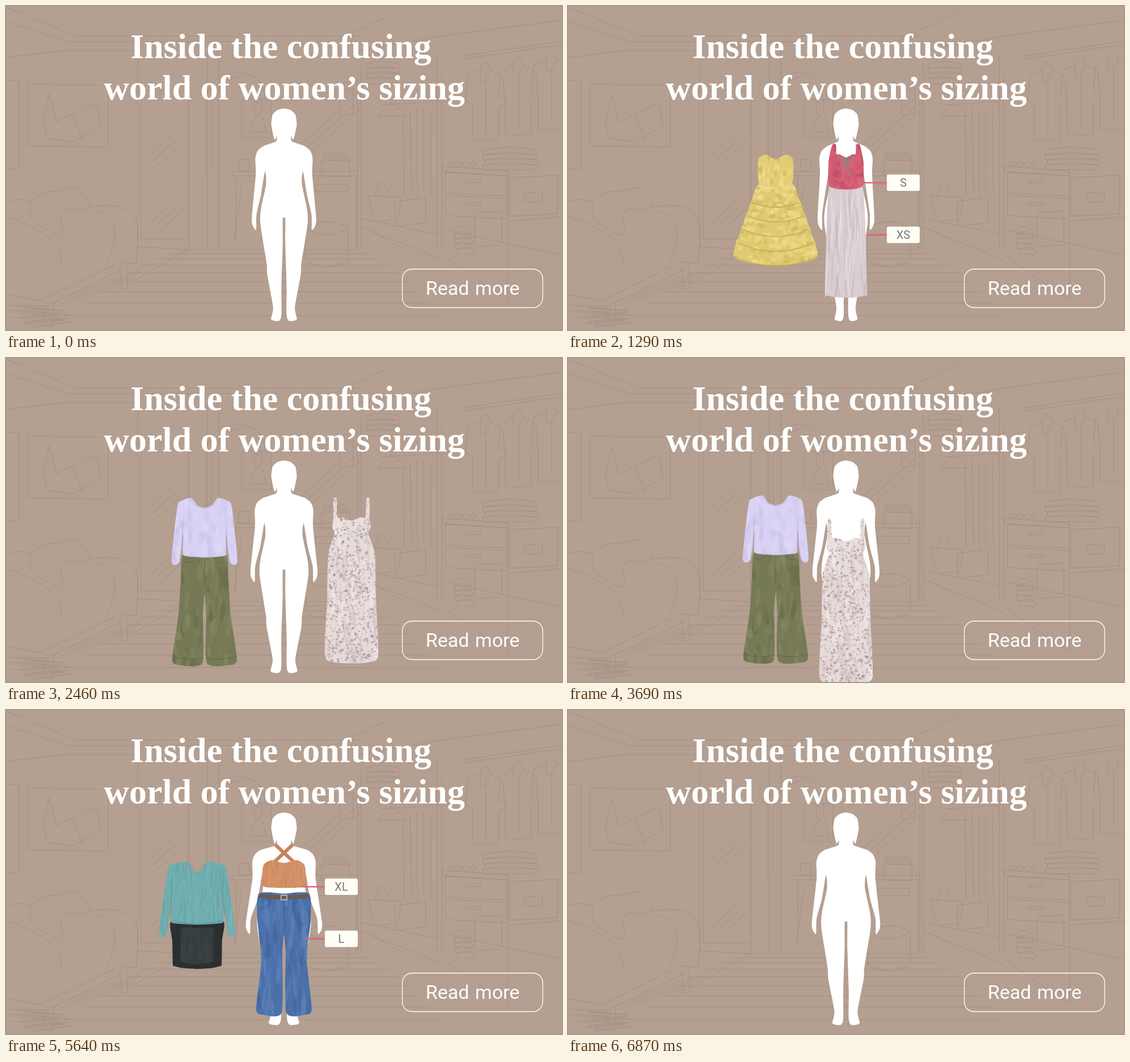
Recreate the animation shown at these times as an HTML page with a canvas. Size 980 by 572 pixels, loop 6.9 s.

```html
<!DOCTYPE html>
<html lang="en">
<head>
<meta charset="utf-8">
<title>Inside the confusing world of women’s sizing</title>
<style>
  html, body { margin: 0; width: 980px; height: 572px; overflow: hidden; background: #b49f91; }
  canvas, svg { position: absolute; left: 0; top: 0; }
  .title { font: bold 62px "Liberation Serif", serif; fill: #fff; text-anchor: middle; }
  .button { font: 34px Roboto, sans-serif; fill: #fff; text-anchor: middle; word-spacing: 2px; }
</style>
</head>
<body>
<canvas id="stage" width="980" height="572"></canvas>
<svg width="980" height="572">
  <text class="title" x="484.5" y="92">Inside the confusing</text>
  <text class="title" x="490.5" y="165">world of women’s sizing</text>
  <rect x="698.5" y="464.5" width="247.5" height="68" rx="17" fill="none" stroke="#fff" stroke-width="1.3"/>
  <text class="button" x="822.5" y="510">Read more</text>
</svg>
<script>
const LOOP = 6900, W = 980, H = 572, CENTER = 490;
const stage = document.getElementById('stage').getContext('2d');

let seed = 7;
const random = () => (seed = seed * 16807 % 2147483647) / 2147483647;
const between = (a, b) => a + (b - a) * random();
const clamp = p => Math.min(1, Math.max(0, p));
const progress = (t, a, b) => clamp((t - a) / (b - a));
const inOut = p => p < .5 ? 4 * p ** 3 : 1 - 4 * (1 - p) ** 3;
const settle = p => 1 - 1.48 * (1 - p) ** 3 + .48 * (1 - p) ** 2;
const repeat = (n, draw) => { for (let i = 0; i < n; i++) draw(i); };

function layer(paint) {
  const canvas = document.createElement('canvas');
  canvas.width = W;
  canvas.height = H;
  paint(canvas.getContext('2d'));
  return canvas;
}

function line(c, d, color, width = 1) {
  c.strokeStyle = color;
  c.lineWidth = width;
  c.stroke(new Path2D(d));
}

// Smooth closed outline mirrored about x = 0; half runs from top centre to bottom centre.
function mirrored(half) {
  const left = half.slice(1, -1).reverse().map(([x, y]) => [-x, y]);
  const pts = [...half, ...left], n = pts.length, path = new Path2D();
  path.moveTo(...pts[0]);
  pts.forEach((p, i) => {
    const before = pts[(i + n - 1) % n], q = pts[(i + 1) % n], after = pts[(i + 2) % n];
    path.bezierCurveTo(
      p[0] + (q[0] - before[0]) / 9, p[1] + (q[1] - before[1]) / 9,
      q[0] - (after[0] - p[0]) / 9, q[1] - (after[1] - p[1]) / 9, ...q);
  });
  path.closePath();
  return path;
}

// The room, as a loose line drawing

const room = layer(c => {
  c.fillStyle = '#b49f91';
  c.fillRect(0, 0, W, H);
  const ink = d => line(c, d, '#a38e81', .9);
  const box = (x, y, w, h, slant = 0) => ink(`M${x} ${y}l${w} ${slant}v${h}l${-w} ${-slant}z`);
  const glare = (x, y, size) => repeat(3, i => ink(`M${x + i * 9} ${y + i * 7}l${size} ${-size * .9}`));
  const pile = (x, y, w, n) => repeat(n, i =>
    ink(`M${x + between(-4, 4)} ${y + i * 9}q${w / 2} -9 ${w} 0q6 4 0 8h${-w}z`));
  const drawer = (x, y, w) => {
    box(x, y, w, 36, 6);
    box(x + w * .33, y + 14, w * .25, 5, -2);
  };

  ink('M0 2L124 53H620M0 28L110 63H470M0 91L100 79H228M580 62L690 10M625 78L768 53L980 25');
  for (const x of [232, 322, 355, 375, 620, 626, 760, 768]) ink(`M${x} ${between(60, 140)}V428`);
  box(-5, 131, 28, 157);
  box(38, 138, 142, 109, 2);
  ink('M72 234L66 205L76 155L90 205L118 190L160 172L168 212L116 240zM118 190L135 238');
  box(238, 150, 84, 261);
  glare(246, 270, 50);
  glare(252, 384, 44);
  glare(520, 245, 90);
  ink('M352 300V165Q362 118 408 118Q452 118 456 160M362 290V170Q376 128 412 125');
  box(415, 165, 52, 67);
  ink('M437 182v-16l7 8l7 -8v16q-7 24 -14 0M440 195l-10 27h30l-8 -27');
  box(588, 150, 24, 44, -4);

  // Dressing table and stool
  box(398, 292, 222, 8);
  box(545, 315, 57, 13);
  box(410, 271, 19, 20);
  box(556, 272, 50, 28, 1);
  repeat(6, i => ink(`M${560 + i * 8} 273v${between(-8, -16)}h4v12`));
  ink('M405 300V415M415 318L402 415M617 300V428M528 392Q565 370 603 392Q565 416 528 392V450Q565 472 603 450V392');

  repeat(9, i => ink(`M${310 - i * 24} ${430 + i * 6 + i * i * 1.07}H${620 + i * 18}`));

  // Bed with sleeping dog, and rug
  ink('M44 346Q60 325 100 326Q130 312 134 332Q150 342 150 355L128 361Q96 350 96 380Q104 398 96 406Q30 382 44 346');
  ink('M0 345Q20 338 44 346M150 355Q232 340 233 400L230 455L200 452L60 520L0 510M0 372Q100 400 98 460M160 362Q212 372 180 450');
  ink('M0 528L70 530L205 465M66 530l2 36h14l2 -42M200 460l4 40h10v-42M232 425L320 430L214 492');
  repeat(16, i => ink(`M${between(0, 50)} ${530 + i * 2.5}l70 ${6 - i}`));
  repeat(14, i => ink(`M${95 + i * 9} ${530 - i * 3}l30 -28`));

  // Wardrobe
  repeat(2, i => drawer(774, 294 + i * 40, 110));
  box(770, 283, 114, 9, 8);
  box(826, 365, 48, 60, -3);
  box(888, 303, 84, 68, -4);
  box(914, 330, 31, 17, -2);
  box(686, 345, 54, 44, -6);
  ink('M625 375L770 405M625 390L768 448M640 395L706 432M884 292V520L770 440M884 380L980 372M770 395L980 440');
  ink('M640 335q5 45 20 45l30 -4l7 -38zM650 337q10 -50 28 0');
  pile(842, 254, 92, 4);
  pile(792, 394, 28, 5);
  pile(634, 102, 56, 4);
  repeat(4, i => ink(`M${778 + i * 13} 280q6 -10 12 -1q-6 11 -12 1`));
  ink('M805 88L980 62M805 94L980 68M660 175L765 168M656 194l24 -24l26 24z');
  repeat(5, i => ink(`M${700 + i * 12} 180l${between(0, 6)} ${between(145, 160)}`));
  repeat(3, i => {
    const x = 836 + i * 58, y = 112 - i * 9;
    ink(`M${x} ${y}q8 -27 18 0l22 14l4 48l-12 4v58h-46v-62l-12 -6l4 -44zv20q8 6 18 -20M${x + 10} ${y + 16}v100`);
  });
});

// Clothes, painted where they are worn with x = 0 in the middle of the figure

const garment = paint => layer(c => {
  c.translate(CENTER, 0);
  paint(c);
});

// Fills a mirrored piece of cloth and mottles it with small ellipses.
function cloth(c, half, base, tones, count, rx, ry) {
  const path = mirrored(half);
  const reach = Math.max(...half.map(p => p[0]));
  const ys = half.map(p => p[1]), top = Math.min(...ys), bottom = Math.max(...ys);
  c.save();
  c.fillStyle = base;
  c.fill(path);
  c.clip(path);
  repeat(count, i => {
    c.fillStyle = tones[i % tones.length];
    c.globalAlpha = between(.35, .8);
    c.beginPath();
    c.ellipse(between(-reach, reach), between(top, bottom),
      rx * between(.5, 1.2), ry * between(.5, 1.2), between(-.15, .15), 0, 7);
    c.fill();
  });
  c.restore();
}

const skirt = (top, waist, bottom, hem, sag) => [
  [0, top], [waist, top], [waist + (hem - waist) * .7, top + (bottom - top) * .45], [hem, bottom],
  [hem * .94, bottom + sag * .4], [hem * .55, bottom + sag * .85], [0, bottom + sag]];

const trousers = (top, waist, hip, knee, hem, bottom) => [
  [0, top], [waist, top], [hip, top + 45], [knee, top + (bottom - top) * .55], [hem, bottom - 10],
  [hem * .75, bottom], [4, bottom - 4], [3, top + 105], [0, top + 70]];

const sleeved = (top, neck, depth, shoulder, cuff, cuffY, waist, hemY) => [
  [0, top + depth], [neck * .65, top + depth * .75], [neck + 4, top], [shoulder - 7, top + 5], [shoulder, top + 16],
  [cuff, cuffY], [cuff - 13, cuffY + 2], [waist, top + 62], [waist, hemY - 8], [waist - 3, hemY], [0, hemY + 3]];

const strapped = (top, strap, neckY, bust, ...tail) => [
  [0, neckY], [strap * .6, neckY - 6], [strap - 1, neckY - 7], [strap, top], [strap + 6, top], [bust - 2, neckY - 4],
  [bust, neckY + 12], ...tail];

const yellow = garment(c => {
  const tones = ['#ecd983', '#d2bb63', '#f0df92'];
  const hem = i => [33 + i * 8.3, 326 + i * 23.5];
  for (let i = 5; i > 0; i--) {
    const [waist, top] = hem(i - 1), [reach, bottom] = hem(i), sag = 7 + i * 2.4;
    cloth(c, skirt(top - 8, waist - 5, bottom, reach, sag), '#e0ca70', tones, 75, 6, 5);
    line(c, `M${-reach} ${bottom + 3}Q0 ${bottom + sag * 2} ${reach} ${bottom + 3}`, '#c4ac56', 1.6);
  }
  cloth(c, [[0, 276], [15, 268], [24, 269], [31, 278], [29, 318], [0, 325]], '#e3cd74', tones, 45, 3, 8);
});

const redAndSkirt = garment(c => {
  cloth(c, skirt(321, 29, 508, 37, 7), '#d8cdd0', ['#e7dfe1', '#c8b9bd', '#ddd0d5'], 85, 1.6, 48);
  cloth(c, strapped(245, 18, 268, 31, [29, 318], [0, 324]), '#cf5a70', ['#de657c', '#bf4d65', '#d6627a'], 55, 6, 9);
  line(c, 'M0 269q-14 -9 -10 3q6 4 10 -3q14 -9 11 3q-6 4 -11 -3l-6 25m6 -25l6 30', '#7c8b82', 2);
});

const lavenderAndTrousers = garment(c => {
  cloth(c, trousers(341, 38, 42, 46, 57, 536), '#767955', ['#858962', '#6a6d4a', '#7c7f59'], 90, 5, 17);
  line(c, 'M-56 521q27 8 53 2M56 521q-27 8 -53 2M-36 352q11 8 18 -6M36 352q-11 8 -18 -6M0 346v50', '#616541');
  cloth(c, sleeved(241, 20, 17, 48, 58, 352, 38, 343), '#d9d2f4', ['#dfdaf7', '#cbc3ec', '#d3cbf1'], 60, 5, 12);
  line(c, 'M-38 284L-41 338M38 284L41 338M-22 248q22 22 44 0', '#bbb1df');
});

const floral = garment(c => {
  const cut = strapped(243, 26, 281, 34, [30, 304], [41, 340], [43, 420], [47, 519], [30, 531], [0, 533]);
  cloth(c, cut, '#e5dbd9', ['#eee7e5', '#d5c7c5'], 100, 3, 22);
  cloth(c, cut, 'transparent', ['#c98791', '#f4efed', '#8d83a3', '#d9a9ad', '#989c91', '#c3a6aa'], 1000, 2.1, 1.9);
});

const tealAndSkirt = garment(c => {
  cloth(c, skirt(340, 46, 416, 43, 8), '#2b2f30', ['#2f3435'], 15, 5, 16);
  cloth(c, skirt(352, 28, 408, 29, 8), '#343c3d', ['#3a4344'], 15, 6, 18);
  cloth(c, sleeved(235, 13, 20, 52, 67, 360, 46, 343), '#70aeb0', ['#7dbabb', '#609c9f', '#6aa6a9'], 190, .8, 20);
  line(c, 'M-17 237L0 256L17 237M-45 264Q-44 304 -49 330M45 264Q44 304 49 330M-44 339Q0 350 44 339', '#559093');
});

const orangeAndJeans = garment(c => {
  cloth(c, trousers(324, 44, 47, 40, 49, 538), '#4b70aa', ['#5f85bb', '#42659c', '#5479b0'], 100, 4, 22);
  line(c, 'M0 338v60M-42 352q13 -2 19 -16M42 352q-13 -2 -19 -16', '#3c5d93');
  line(c, 'M-44 328Q0 334 44 328', '#685b55', 8);
  line(c, 'M-5 327h10v8h-10z', '#b6b2ad', 2);
  line(c, 'M-21 272L15 238M21 272L-15 238', '#ca8259', 6);
  cloth(c, [[0, 270], [22, 265], [35, 272], [38, 284], [37, 311], [0, 314]], '#d39067', ['#de9b72', '#c48058'], 90, .8, 12);
});

// Each round: the right outfit is put on, swapped for the left one, then that one drops.
const rounds = [
  { enter: 0, first: [400, 640], swap: [1370, 1610], last: [2190, 2400] },
  { enter: 2250, first: [2650, 2820], swap: [3614, 3865], last: [4450, 4660] },
  { enter: 4470, first: [4765, 5010], swap: [5790, 6210], last: [6660, 6870] },
];

// away is the offset of the hanging place from the worn one.
const left = (round, art, away, ...tags) => ({ art, away, tags, side: -1, enter: round.enter, wear: round.swap, drop: round.last });
const right = (round, art, away, ...tags) => ({ art, away, tags, side: 1, enter: round.enter, wear: round.first, drop: round.swap });
const outfits = [
  left(rounds[0], yellow, [-124, -5], 'M'),
  right(rounds[0], redAndSkirt, [112, -17], 'S', 'XS'),
  left(rounds[1], lavenderAndTrousers, [-140, 2], 'M', 'L'),
  right(rounds[1], floral, [119, 2], 'M'),
  left(rounds[2], tealAndSkirt, [-153, 33], 'L', 'XL'),
  right(rounds[2], orangeAndJeans, [125, -3], 'XL', 'L'),
];

// Slimmest outline: head, arm, torso, leg.
const figure = [
  [0, 181], [12, 184], [20, 192], [22.5, 208], [20, 223], [16.5, 236], [13, 230], [14, 239],
  [32, 247], [43, 256], [47, 270], [46, 297], [50, 373], [48, 388], [42, 395], [42, 368], [37, 333], [30, 292],
  [28, 314], [37, 358], [38, 385], [27, 455], [26, 475], [17, 532], [20, 553],
  [8, 556], [4, 545], [4, 495], [2, 420], [2, 376], [0, 374],
];

// Body parts widen with their own width, and arms swing out further towards the hand.
const widening = ([x, y]) => y < 240 ? 0 : Math.min(9, x / 3) + (x > 40 ? 9 * progress(y, 290, 385) : 0);

function drawFigure(t) {
  const size = .53 * inOut(progress(t, 2180, 2460)) + .47 * inOut(progress(t, 4430, 4700))
    - inOut(progress(t, 6680, 7090)) + 1 - inOut(progress(t + LOOP, 6680, 7090));
  stage.save();
  stage.translate(CENTER, 0);
  stage.fillStyle = '#fff';
  stage.fill(mirrored(figure.map(p => [p[0] + widening(p) * size, p[1]])));
  stage.restore();
}

function drawOutfit({ art, away, enter, wear, drop }, t) {
  if (t < enter || t >= drop[1]) return;
  const off = 1 - inOut(progress(t, ...wear));
  const lift = 560 * (settle(progress(t, enter, enter + 270)) - 1);
  const fall = 370 * inOut(progress(t, ...drop));
  stage.drawImage(art, away[0] * off, away[1] * off + lift + fall);
}

function drawTags({ wear, drop, side, tags }, t) {
  stage.globalAlpha = progress(t, wear[1] - 30, wear[1] + 30) * (1 - progress(t, drop[0] - 75, drop[0]));
  if (!stage.globalAlpha) return;
  tags.forEach((label, i) => {
    const x = CENTER + side * 101, y = 312 + i * 92;
    line(stage, `M${CENTER + side * (29 + i * 8)} ${y}H${x - side * 28}`, '#e2607a', 2.5);
    stage.fillStyle = '#fefef6';
    stage.beginPath();
    stage.roundRect(x - 29, y - 14.5, 58, 29, 3);
    stage.fill();
    stage.fillStyle = '#777';
    stage.fillText(label, x, y + 7);
  });
}

stage.font = '20px Roboto, sans-serif';
stage.textAlign = 'center';
const start = performance.now();

function draw() {
  const t = (performance.now() - start) % LOOP;
  stage.globalAlpha = 1;
  stage.drawImage(room, 0, 0);
  drawFigure(t);
  outfits.forEach(outfit => drawOutfit(outfit, t));
  outfits.forEach(outfit => drawTags(outfit, t));
  requestAnimationFrame(draw);
}
draw();
</script>
</body>
</html>
```
